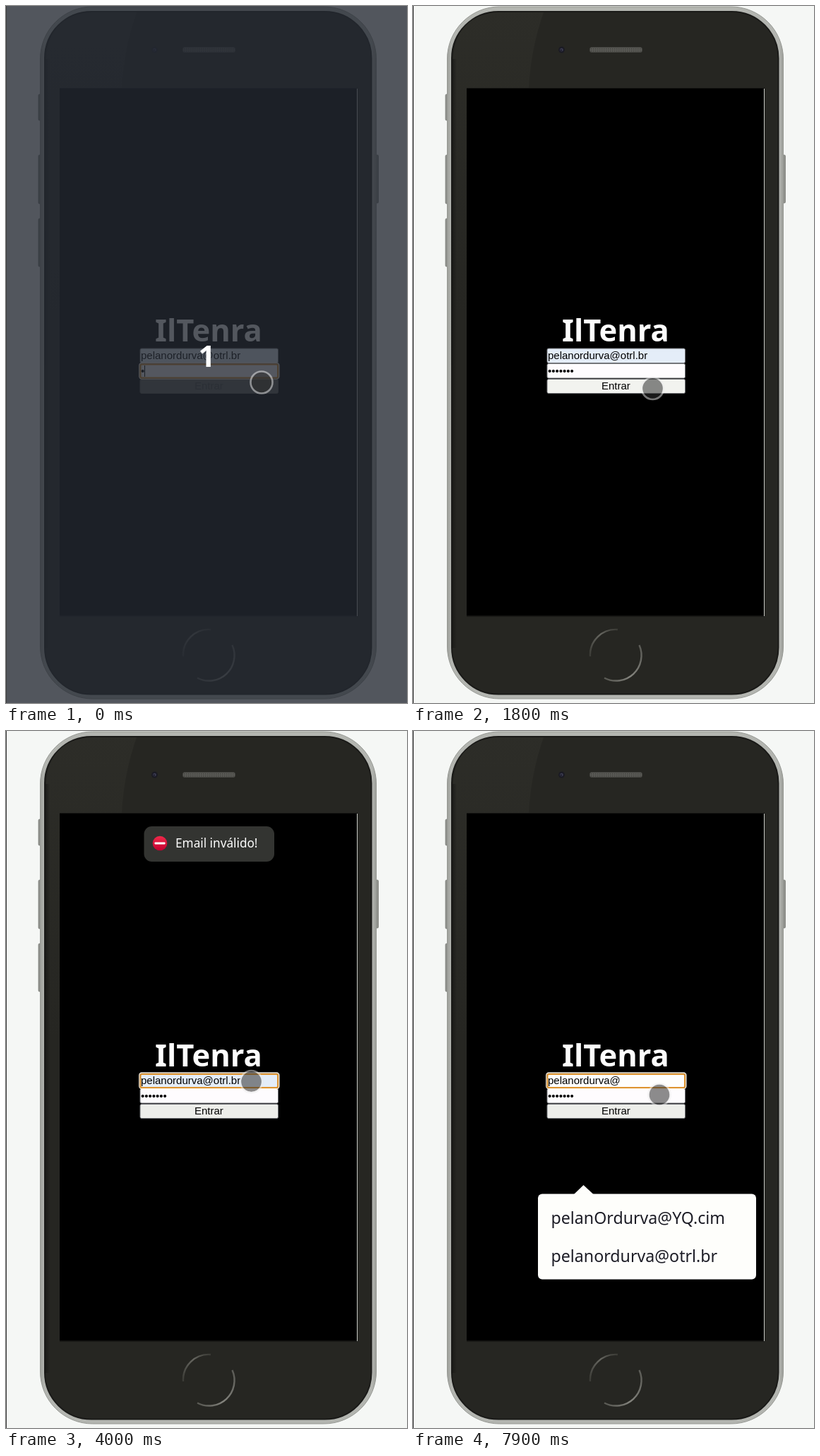
Animation of 568x987 px, one loop 8000 ms. Source, as an HTML page:

```html
<!DOCTYPE html>
<html lang="pt-BR">
<head>
<meta charset="utf-8">
<title>Login</title>
<style>
  html, body { margin: 0; width: 100%; height: 100%; overflow: hidden; background: #f5f7f5; }
  svg { display: block; width: 568px; height: 987px; }
  .form { font: 15px "Liberation Sans", Arial, sans-serif; fill: #000; }
  .ui { font-family: "Noto Sans", "Open Sans", sans-serif; }
  .bold { font-weight: 700; }
  .semi { font-weight: 600; }
  text { white-space: pre; }
</style>
</head>
<body>
<svg viewBox="0 0 568 987">
  <defs>
    <linearGradient id="shell" x2="1" y2="0">
      <stop offset="0" stop-color="#9c9e99"/><stop offset=".012" stop-color="#b3b5b0"/>
      <stop offset=".988" stop-color="#b3b5b0"/><stop offset="1" stop-color="#9c9e99"/>
    </linearGradient>
    <linearGradient id="sheen" x2="0" y2="1">
      <stop offset="0" stop-color="#35352f" stop-opacity=".45"/><stop offset="1" stop-color="#35352f" stop-opacity="0"/>
    </linearGradient>
    <linearGradient id="edge" x2="1" y2="0">
      <stop offset="0" stop-color="#171715" stop-opacity=".7"/><stop offset="1" stop-color="#171715" stop-opacity="0"/>
    </linearGradient>
    <linearGradient id="red" x2="0" y2="1">
      <stop offset="0" stop-color="#f0294a"/><stop offset="1" stop-color="#c2002f"/>
    </linearGradient>
    <linearGradient id="arcA" x1="0" y1="1" x2="1" y2="0">
      <stop offset="0" stop-color="#3a3a35"/><stop offset=".6" stop-color="#666660"/><stop offset="1" stop-color="#3a3a35"/>
    </linearGradient>
    <linearGradient id="arcB" x1="1" y1="0" x2="0" y2="1">
      <stop offset="0" stop-color="#5a5a55"/><stop offset=".6" stop-color="#83837d"/><stop offset="1" stop-color="#55554f"/>
    </linearGradient>
    <pattern id="mesh" width="3" height="3" patternUnits="userSpaceOnUse">
      <rect width="3" height="3" fill="#5a5a56"/><rect width="1.5" height="1.5" fill="#41413d"/>
    </pattern>
    <clipPath id="screen"><rect x="76" y="116" width="422" height="748"/></clipPath>
  </defs>

  <rect width="568" height="987" fill="#f5f7f5"/>
  <g fill="#8f918c" stroke="#777974" stroke-width=".7">
    <rect x="46" y="125" width="5" height="37" rx="1.5"/>
    <rect x="46" y="211" width="5" height="69" rx="1.5"/>
    <rect x="46" y="301" width="5" height="68" rx="1.5"/>
    <rect x="522" y="211" width="5.5" height="68" rx="1.5"/>
  </g>
  <rect x="48.500" y="1" width="476" height="980" rx="74" fill="url(#shell)" stroke="#969893"/>
  <rect x="55" y="8" width="462.500" height="966.500" rx="66" fill="#262622" stroke="#1a1a18" stroke-width="2"/>
  <path d="M122 9H185Q167 60 164 116H76V435H57V75Q60 12 122 9Z" fill="url(#sheen)"/>
  <rect x="56" y="75" width="6" height="834" fill="url(#edge)"/>

  <circle cx="210.500" cy="62" r="4.500" fill="#1b1b24"/>
  <circle cx="210.500" cy="62" r="2.300" fill="#3c3c52"/>
  <circle cx="210" cy="62.500" r="1" fill="#14141c"/>
  <rect x="250.500" y="58.500" width="74" height="7" rx="2.500" fill="url(#mesh)" stroke="#454541" stroke-width=".8"/>
  <g fill="none" stroke-width="2.400">
    <path d="M251 921A36 36 0 0 1 290 883" stroke="url(#arcA)"/>
    <path d="M320.500 905A36 36 0 0 1 271 951.500" stroke="url(#arcB)"/>
  </g>

  <rect x="76" y="116.500" width="422" height="747" fill="#000"/>
  <path d="M76 864.500H498" stroke="#191917"/>
  <path d="M497.500 117V864" stroke="#c9cac5"/>

  <text class="ui bold" x="287" y="475" font-size="43.500" text-anchor="middle" fill="#fdfdfd">IlTenra</text>

  <g stroke="#74767a">
    <rect id="emailBox" x="190" y="485" width="195.500" height="20.500" rx="2"/>
    <rect x="190" y="506.500" width="195.500" height="20.500" rx="2" fill="#fefcfe"/>
    <rect id="button" x="190" y="528.500" width="195.500" height="20" rx="2"/>
  </g>
  <g id="ring" fill="none">
    <rect x="188.800" y="484" width="198" height="22.600" rx="3.500" stroke="#fdf3e4" stroke-width="1.400"/>
    <rect x="190.500" y="486" width="194.500" height="19" rx="2" stroke="#de9430" stroke-width="2"/>
  </g>
  <text class="form" id="email" x="191" y="500"></text>
  <text class="form" id="password" x="191" y="522"></text>
  <text class="form" id="label" x="267" y="543">Entrar</text>
  <rect id="caret" width="1" height="16" fill="#000"/>

  <g clip-path="url(#screen)">
    <g id="toast">
      <rect x="195.500" y="135" width="184.500" height="50" rx="11" fill="#333431"/>
      <circle cx="218" cy="159" r="10.300" fill="url(#red)"/>
      <rect x="210.500" y="157.600" width="15" height="2.800" rx=".8" fill="#fff"/>
      <text class="ui" x="240" y="165" font-size="17.200" fill="#fdfdfd">Email inválido!</text>
    </g>
  </g>

  <g id="popup" class="ui" font-size="23.200" fill="#1d1d26">
    <path d="M228 656L241.500 643L255.500 656Z" fill="#fefefb"/>
    <rect id="panel" y="655.500" rx="6" fill="#fefefb"/>
    <text id="row1" y="698"></text>
    <text id="row2" x="195.500" y="752"></text>
  </g>

  <g id="dim">
    <rect width="568" height="987" fill="#252933" fill-opacity=".78"/>
    <text class="ui semi" x="284.500" y="511" font-size="42" text-anchor="middle" fill="#fff">1</text>
  </g>
  <g id="pointer">
    <circle r="14.500" fill="#2d2d2d" fill-opacity=".55"/>
    <circle r="15.500" fill="none" stroke="#ebebeb" stroke-opacity=".5" stroke-width="2.600"/>
  </g>
  <rect width="1" height="987" fill="#3c3c3c"/>
</svg>
<script>
const LOOP = 8000, TICK = 100;
const USER = "pelanordurva@", FULL = USER + "otrl.br", OTHER = "pelanOrdurva@YQ.cim";
const $ = id => document.getElementById(id);
const show = (id, on) => $(id).setAttribute("visibility", on ? "visible" : "hidden");
const set = (id, attrs) => { for (const k in attrs) $(id).setAttribute(k, attrs[k]); };

// Each table row is [start ms, value]; the value holds until the next row.
const pointerSteps = [[0, [362, 533]], [600, [364, 536]], [800, [365, 540]], [1200, [366, 545]],
  [1300, [351, 543]], [1400, [339.5, 541.5]], [2700, [325, 541]], [2900, [323, 533]], [3000, [325, 518]],
  [3100, [334, 502]], [3200, [343, 491]], [3500, [347.5, 496.5]], [7900, [349, 515]]];
const dotSteps = [[0, 1], [500, 2], [600, 3], [800, 4], [900, 5], [1100, 6], [1300, 7]];
const domainSteps = [[0, 7], [4400, 5], [4600, 4], [4800, 6], [4900, 3], [5500, 1], [5600, 0]];
const buttonSteps = [[0, "#5e5f5b"], [500, "#e4e5e0"], [1700, "#f2f3ef"], [1900, "#e4e5e0"], [3500, "#edeeea"]];
const focusSteps = [[0, "password"], [1700, ""], [3500, "email"]];
const caretSteps = [[0, 1], [4000, 0], [4400, 1], [5800, 0], [6300, 1], [6800, 0], [7300, 1], [7800, 0]];
const popupSteps = [[0, 0], [4400, 1], [5700, 2]];

const at = (steps, t) => steps.reduce((v, [start, value]) => t >= start ? value : v, steps[0][1]);
const easeOut = (t, start, span) => 1 - (1 - Math.min(1, Math.max(0, (t - start) / span))) ** 3;

function drawToast(t) {
  show("toast", t >= 1900 && t < 5900);
  const enter = easeOut(t, 1840, 300), exit = easeOut(t, 5660, 340);
  const dy = -100 * (1 - enter) - 75 * exit;
  const scale = 0.6 + 0.4 * enter - 0.4 * exit;
  set("toast", {
    transform: `translate(287.75 ${160 + dy}) scale(${scale}) translate(-287.75 -160)`,
    opacity: (0.5 + 0.5 * enter) * (1 - exit)
  });
}

function drawForm(t) {
  const focus = at(focusSteps, t);
  $("email").textContent = FULL.slice(0, USER.length + at(domainSteps, t));
  $("password").textContent = "•".repeat(at(dotSteps, t));
  set("emailBox", { fill: t < 4400 ? "#e4edf8" : "#fefefd" });
  set("button", { fill: at(buttonSteps, t), stroke: t < 500 ? "#50514e" : "#74767a" });
  $("label").style.fill = t < 500 ? "#41423f" : "#000";
  show("ring", focus);
  set("ring", { transform: `translate(0 ${focus === "password" ? 21.5 : 0})` });
  show("caret", focus && at(caretSteps, t));
  if (focus) set("caret", {
    x: Math.round(191 + $(focus).getComputedTextLength()),
    y: focus === "email" ? 487 : 509
  });
}

function drawPopup(t) {
  const rows = at(popupSteps, t), left = rows === 2 ? 177 : 195;
  show("popup", rows);
  set("panel", { x: left, width: 486 - left, height: rows === 2 ? 121 : 66.5 });
  set("row1", { x: left + 18.5 });
  $("row1").textContent = rows === 2 ? OTHER : FULL;
  $("row2").textContent = rows === 2 ? FULL : "";
}

function draw(now) {
  const t = Math.floor(now % LOOP / TICK) * TICK;
  show("dim", t < 200);
  set("pointer", { transform: `translate(${at(pointerSteps, t)})` });
  drawToast(t);
  drawForm(t);
  drawPopup(t);
}

const start = performance.now();
function frame() {
  draw(performance.now() - start);
  requestAnimationFrame(frame);
}
frame();
</script>
</body>
</html>
```
